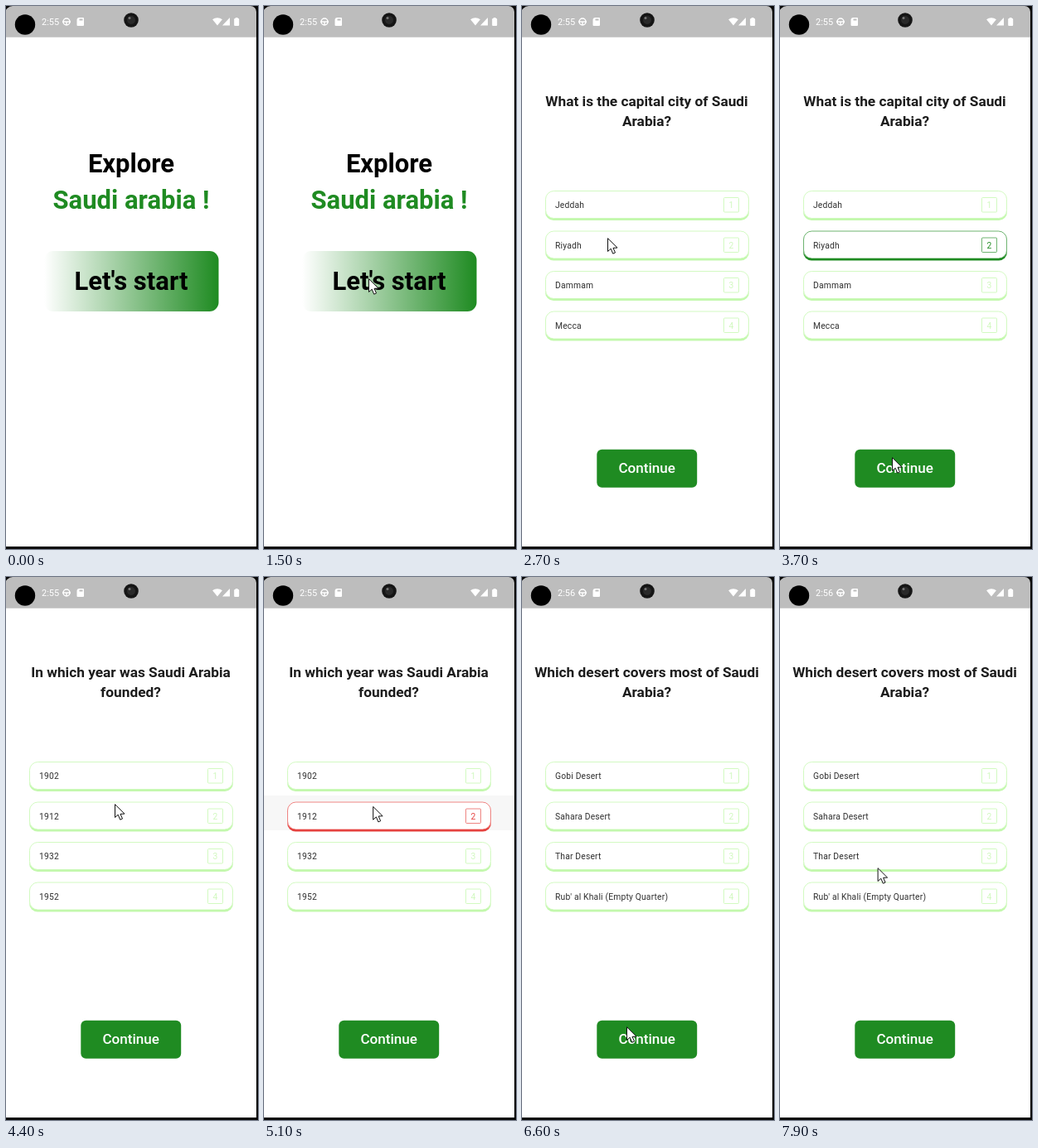
Write an HTML page with a canvas that moves like this. It is 304x656 px and loops after 8000 ms.

```html
<!DOCTYPE html>
<html lang="en">
<head>
<meta charset="utf-8">
<title>Quiz app</title>
<style>
  html, body { margin: 0; width: 100%; height: 100%; overflow: hidden; background: #fff; }
  canvas { display: block; width: 304px; height: 656px; }
</style>
</head>
<body>
<canvas></canvas>
<script>
const WIDTH = 304, HEIGHT = 656, LOOP = 8000, MID = 151;
const GREEN = '#1f8b22', RED = '#e5423f', PALE = '#c3f8ad', GREY = '#bdbdbd';
const CLOCK_CHANGE = 6200, ENTRY = 300, SPLASH = 600;
const canvas = document.querySelector('canvas');
const ctx = canvas.getContext('2d');
const ratio = window.devicePixelRatio || 1;
canvas.width = WIDTH * ratio;
canvas.height = HEIGHT * ratio;

// Each screen: when it appears, its question and answers; the second answer is picked.
const screens = [
  { start: 1600, lines: ['What is the capital city of Saudi', 'Arabia?'],
    answers: ['Jeddah', 'Riyadh', 'Dammam', 'Mecca'], pickAt: 2900, tapAt: 3780, color: GREEN },
  { start: 3900, lines: ['In which year was Saudi Arabia', 'founded?'],
    answers: ['1902', '1912', '1932', '1952'], pickAt: 5000, tapAt: 5850, color: RED },
  { start: 6100, lines: ['Which desert covers most of Saudi', 'Arabia?'],
    answers: ['Gobi Desert', 'Sahara Desert', 'Thar Desert', "Rub' al Khali (Empty Quarter)"] }
];

// The pointer sets off at each time and glides to the given place.
const GLIDE = 350;
const glides = [
  { at: 100, x: 232, y: 240 },
  { at: 400, x: 90, y: 318 },
  { at: 750, x: 126, y: 329 },
  { at: 2250, x: 103, y: 280 },
  { at: 2950, x: 135, y: 545 },
  { at: 3950, x: 131, y: 274 },
  { at: 5080, x: 147, y: 535 },
  { at: 6100, x: 126, y: 543 },
  { at: 6630, x: 103, y: 299 },
  { at: 7530, x: 117.6, y: 351 }
];

const clamp = v => Math.max(0, Math.min(1, v));
const smooth = v => v * v * (3 - 2 * v);
const mix = (a, b, k) => a + (b - a) * k;

function text(str, x, y, size, weight, color, align = 'center', spacing = 0) {
  ctx.font = `${weight} ${size}px Roboto, sans-serif`;
  ctx.letterSpacing = spacing + 'px';
  ctx.textAlign = align;
  ctx.fillStyle = color;
  ctx.fillText(str, x, y);
}

function fillBox(x, y, w, h, r, color) {
  ctx.beginPath();
  ctx.roundRect(x, y, w, h, r);
  ctx.fillStyle = color;
  ctx.fill();
}

function strokeBox(x, y, w, h, r, color, lineWidth) {
  ctx.beginPath();
  ctx.roundRect(x, y, w, h, r);
  ctx.strokeStyle = color;
  ctx.lineWidth = lineWidth;
  ctx.stroke();
}

function disc(x, y, r, color) {
  ctx.beginPath();
  ctx.arc(x, y, r, 0, 2 * Math.PI);
  ctx.fillStyle = color;
  ctx.fill();
}

function drawWelcome() {
  fillBox(0, 37, 302, 616, 0, '#fff');
  text('Explore', MID, 201, 31, 'bold', '#000');
  text('Saudi arabia !', MID, 244.5, 31, 'bold', GREEN);
  const fade = ctx.createLinearGradient(46, 0, 256, 0);
  fade.addColorStop(0, '#fff');
  fade.addColorStop(1, GREEN);
  fillBox(46, 296, 210.5, 73, 11, fade);
  text("Let's start", MID, 342.5, 31, 'bold', '#000');
}

function drawAnswer(label, index, picked) {
  const y = 223 + index * 48.5;
  const color = picked || PALE;
  const line = picked ? 0.65 : 0.75;
  fillBox(28, y + 2, 246, 34, 10, color);
  fillBox(28, y, 246, 33.5, 10, '#fff');
  strokeBox(28.5, y + 0.5, 245, 33, 10, color, line);
  text(label, 40, y + 21, 10.3, 400, '#303030', 'left', 0.18);
  strokeBox(243.5, y + 8.5, 18, 17.5, 1, color, line);
  text(index + 1, 252.5, y + 21, 10.3, 400, picked || '#d0f8be');
}

function drawQuiz({ lines, answers, pickAt, tapAt, color }, t) {
  fillBox(0, 37, 302, 616, 0, '#fff');
  lines.forEach((line, i) => text(line, MID - 0.5, 121 + i * 24, 17.3, 600, '#1c1c1c'));
  if (t >= pickAt) {
    const alpha = 0.04 * (1 - clamp((t - pickAt) / SPLASH));
    fillBox(0, 264, 302, 42, 0, `rgba(0,0,0,${alpha})`);
  }
  answers.forEach((label, i) => drawAnswer(label, i, i === 1 && t >= pickAt && color));
  fillBox(90.3, 535.7, 120.9, 46, 6, t >= tapAt ? '#26882d' : GREEN);
  text('Continue', MID - 0.3, 564, 17.1, 500, '#fff');
}

function drawStatusBar(t) {
  fillBox(0, 0, 302, 37.7, 0, GREY);
  text(t < CLOCK_CHANGE ? '2:55' : '2:56', 43, 23, 11, 400, '#fff', 'left');

  // Sync ring
  strokeBox(69, 15, 8, 8, 4, '#fff', 1.5);
  fillBox(68, 18.3, 10, 1.4, 0, '#fff');
  fillBox(72.3, 19, 1.4, 4, 0, '#fff');

  // Memory card and battery
  fillBox(85.5, 14, 8.5, 10, [3, 1, 1, 1], '#fff');
  fillBox(88.5, 15.5, 4, 2, 0, GREY);
  fillBox(275.2, 15, 6, 9, 1, '#fff');
  fillBox(276.8, 14, 2.8, 2, 0, '#fff');

  // Wifi fan and signal wedge
  ctx.beginPath();
  ctx.moveTo(255, 23.5);
  ctx.arc(255, 23.5, 9.3, -Math.PI * 0.72, -Math.PI * 0.28);
  ctx.moveTo(261, 23.5);
  ctx.lineTo(270, 23.5);
  ctx.lineTo(270, 14);
  ctx.fill();

  // Camera hole and corner button
  disc(151, 17, 8.8, '#151515');
  disc(151, 17, 5, '#292929');
  disc(149, 14.5, 1.5, '#777');
  disc(23, 22.5, 12.2, '#000');
}

function drawBezel() {
  ctx.fillStyle = '#080808';
  ctx.beginPath();
  ctx.rect(0, 0, WIDTH, HEIGHT);
  ctx.roundRect(-1, 0, 303, 653, [9, 7, 0, 0]);
  ctx.fill('evenodd');
}

function drawPointer(t) {
  const started = glides.filter(g => t >= g.at);
  if (!started.length) return;
  const to = started.pop(), from = started.pop() || to;
  const k = smooth(clamp((t - to.at) / GLIDE));
  ctx.save();
  ctx.translate(mix(from.x, to.x, k), mix(from.y, to.y, k));
  const arrow = new Path2D('M.5 .7V16.5L4.2 13.2 6.7 19.2 9.5 18 7 12.3 12 12.1Z');
  ctx.fillStyle = '#fff';
  ctx.fill(arrow);
  ctx.strokeStyle = '#111';
  ctx.lineWidth = 1;
  ctx.stroke(arrow);
  ctx.restore();
}

function draw(t) {
  ctx.setTransform(ratio, 0, 0, ratio, 0, 0);
  const screen = screens.filter(s => t >= s.start).pop();
  const entry = clamp((t - screens[0].start) / ENTRY);
  if (entry < 1) drawWelcome();
  if (screen) {
    const scale = mix(0.88, 1, 1 - (1 - entry) ** 3);
    ctx.save();
    ctx.globalAlpha = clamp(entry * 2);
    ctx.translate(MID, 345);
    ctx.scale(scale, scale);
    ctx.translate(-MID, -345);
    drawQuiz(screen, t);
    ctx.restore();
  }
  drawStatusBar(t);
  drawBezel();
  drawPointer(t);
}

const began = performance.now();
function tick() {
  draw((performance.now() - began) % LOOP);
  requestAnimationFrame(tick);
}
tick();
</script>
</body>
</html>
```
